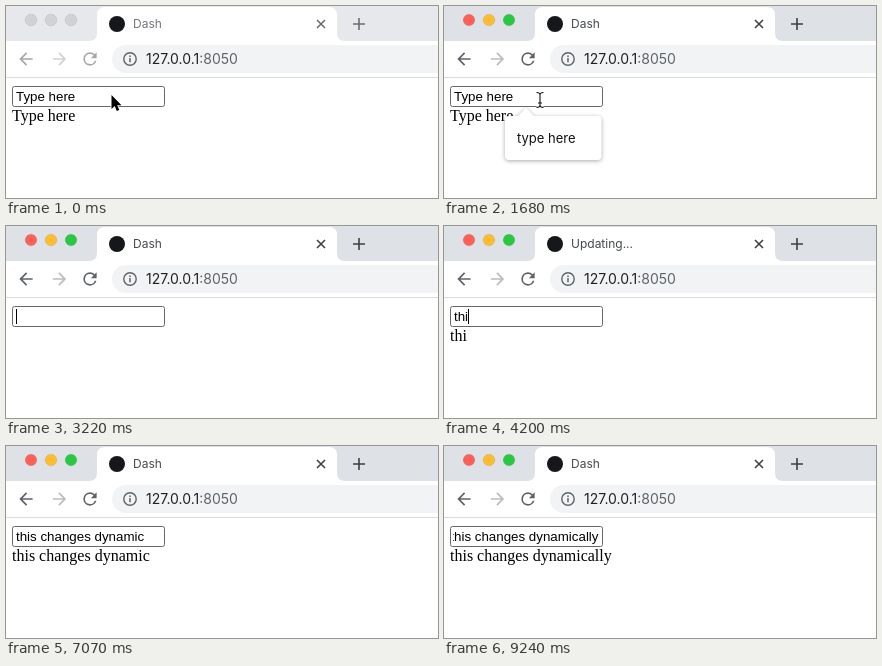
An HTML page for the animation above (9380 ms loop, 432x192 px).

```html
<!DOCTYPE html>
<html lang="en">
<head>
<meta charset="utf-8">
<title>Live input</title>
<style>
  html, body { margin: 0; width: 100%; height: 100%; overflow: hidden; background: #fff; }
  svg { display: block; width: 432px; height: 192px; --strip: #dee1e6; --icon: #5f6368; --off: #babcbe; --title: #45494d; --tool: #3c4043; }
  svg.idle { --strip: #e7e8eb; --icon: #a5a8ab; --off: #cfd1d3; --title: #72767a; --tool: #686c70; }
  .ui { font-family: Inter, Roboto, sans-serif; }
  .lights circle { stroke: #0002; stroke-width: .6; }
  .idle .lights circle { fill: #d1d2d4; stroke: #bfc0c2; }
  .line { fill: none; stroke: var(--tool); stroke-width: 1.6; }
  .field { font: 13.333px "Liberation Sans", Arial, sans-serif; }
  .page { font: 16px "Liberation Serif", "Times New Roman", serif; }
  .popup { filter: drop-shadow(0 1px 2px #0005); }
</style>
</head>
<body>
<svg id="stage" viewBox="0 0 432 192">
  <defs>
    <path id="arrowIcon" transform="scale(.83) translate(-12 -12)" d="M20 11H7.83l5.59-5.59L12 4l-8 8 8 8 1.41-1.41L7.83 13H20z"/>
    <clipPath id="fieldClip"><rect x="9" y="82" width="147" height="18"/></clipPath>
  </defs>

  <rect width="432" height="35" fill="var(--strip)"/>
  <path d="M83 35Q91 35 91 27V9Q91 1 99 1H323Q331 1 331 9V27Q331 35 339 35Z" fill="#fff"/>
  <g class="lights">
    <circle cx="25" cy="14" r="5.8" fill="#fe5f57"/>
    <circle cx="45" cy="14" r="5.8" fill="#febc2e"/>
    <circle cx="65" cy="14" r="5.8" fill="#28c840"/>
  </g>
  <circle cx="111" cy="18" r="8" fill="#15171a"/>
  <text id="title" class="ui" x="127" y="22" font-size="12" fill="var(--title)"></text>
  <path class="line" d="M311 14l8 8m0-8l-8 8M347 18h12m-6-6v12"/>

  <g fill="var(--icon)">
    <use href="#arrowIcon" x="20" y="53"/>
    <use href="#arrowIcon" transform="translate(53.5 53) scale(-1 1)" fill="var(--off)"/>
    <path transform="translate(84 53) scale(.83) translate(-12 -12)" d="M17.65 6.35A7.96 7.96 0 0 0 12 4a8 8 0 1 0 7.73 10h-2.08A6 6 0 1 1 12 6c1.66 0 3.14.69 4.22 1.78L13 11h7V4z"/>
  </g>
  <rect x="106" y="39" width="350" height="28" rx="14" fill="#f1f3f4"/>
  <circle cx="124" cy="53" r="6.2" fill="none" stroke="#5f6368" stroke-width="1.4"/>
  <path d="M124 52v4.3M124 49.4v1.5" stroke="#5f6368" stroke-width="1.5"/>
  <text class="ui" x="140" y="58" font-size="14" fill="#202124">127.0.0.1<tspan fill="#5f6368">:8050</tspan></text>
  <path d="M0 71.5H432" stroke="#d9dbde"/>

  <rect x="6.5" y="80.5" width="152" height="20" rx="2" fill="#fff" stroke="#686868"/>
  <g clip-path="url(#fieldClip)">
    <text id="typed" class="field" y="95"></text>
    <rect id="caret" y="83" width="1" height="15"/>
  </g>
  <text id="output" class="page" x="6" y="115"></text>

  <g id="popup">
    <path class="popup" d="M65 110H74L82 102L90 110H153.5Q157.5 110 157.5 114V150Q157.5 154 153.5 154H65Q61 154 61 150V114Q61 110 65 110Z" fill="#fff"/>
    <text class="ui" x="73" y="137" font-size="13" fill="#111">type here</text>
  </g>

  <path id="pointer" d="M0 0V14L3.2 11L5.3 16L7.8 15L5.7 10.2H10Z" stroke="#fff" stroke-width="1.6" paint-order="stroke"/>
  <g id="beam" fill="none">
    <path d="M-3.5-7.5Q0-7.5 0-5V5Q0 7.5-3.5 7.5M3.5-7.5Q0-7.5 0-5V5Q0 7.5 3.5 7.5M-2 3H2" stroke="#fff" stroke-width="2.6"/>
    <path d="M-3.5-7.5Q0-7.5 0-5V5Q0 7.5-3.5 7.5M3.5-7.5Q0-7.5 0-5V5Q0 7.5 3.5 7.5M-2 3H2" stroke="#111" stroke-width="1.1"/>
  </g>
</svg>
<script>
  const LOOP = 9380, STEP = 70;
  const START = "Type here", PHRASE = "this changes dynamically";
  const ACTIVE = 700, FIRST_KEY = 2030, TITLE_END = 5390;

  // Key press times: nine deletions, then one per letter of the phrase.
  const deletes = Array.from(START, (_, i) => FIRST_KEY + i * 140);
  const letters = [
    3780, 3990, 4200, 4340,
    4550, 4690, 4760, 4900, 4970, 5110, 5180, 5250, 5320,
    5530, 5740, 5950, 6090, 6230, 6370, 6510,
    7210, 7350, 7420, 7630
  ];
  const keys = [...deletes, ...letters];
  const slowReplies = new Set([5530, 5950, 6090, 6230, 6370, 6510, 7210]);
  const replies = letters.map(k => k + (slowReplies.has(k) ? STEP : 0));

  const popupTimes = [[1260, 3150], [3850, 3990]];
  const caretTimes = [[1120, 1610], [FIRST_KEY, 7070], [7210, 8190], [8680, 9240]];
  const mousePath = [[0, 105.5, 89], [70, 105.5, 89], [280, 104.5, 90.5], [420, 104, 91], [560, 104, 91], [1470, 97, 94], [1680, 96, 94]];

  const $ = id => document.getElementById(id);
  const stage = $("stage"), typed = $("typed"), caret = $("caret");
  const within = (t, spans) => spans.some(([a, b]) => t >= a && t < b);
  const count = (t, times) => times.filter(k => k <= t).length;
  const show = (id, on) => $(id).setAttribute("visibility", on ? "visible" : "hidden");
  const setText = (node, text) => {
    const value = text.replace(/ /g, "\u00a0");
    if (node.textContent !== value) node.textContent = value;
  };

  function textAt(t, times) {
    const removed = count(t, deletes);
    return removed < START.length ? START.slice(0, START.length - removed) : PHRASE.slice(0, count(t, times));
  }

  function mouseAt(t) {
    const i = mousePath.findIndex(p => p[0] > t);
    if (i < 0) return mousePath.at(-1).slice(1);
    const [t0, x0, y0] = mousePath[i - 1], [t1, x1, y1] = mousePath[i];
    const f = (t - t0) / (t1 - t0);
    return [x0 + (x1 - x0) * f, y0 + (y1 - y0) * f];
  }

  function draw(now) {
    const t = Math.floor(now % LOOP / STEP) * STEP;
    stage.classList.toggle("idle", t < ACTIVE);

    const updating = t < TITLE_END && keys.some(k => t >= k && t < k + STEP);
    setText($("title"), updating ? "Updating..." : "Dash");

    setText(typed, textAt(t, letters));
    setText($("output"), textAt(t, replies));
    const width = typed.textContent ? typed.getComputedTextLength() : 0;
    const left = Math.min(10, 154.5 - width);
    typed.setAttribute("x", left);
    caret.setAttribute("x", Math.floor(left + width));
    show("caret", within(t, caretTimes));
    show("popup", within(t, popupTimes));

    const place = `translate(${mouseAt(t)})`;
    $("pointer").setAttribute("transform", place);
    $("beam").setAttribute("transform", place);
    show("pointer", t < ACTIVE);
    show("beam", t >= ACTIVE && t < FIRST_KEY);
  }

  const begin = performance.now();
  function tick() {
    draw(performance.now() - begin);
    requestAnimationFrame(tick);
  }
  tick();
</script>
</body>
</html>
```
